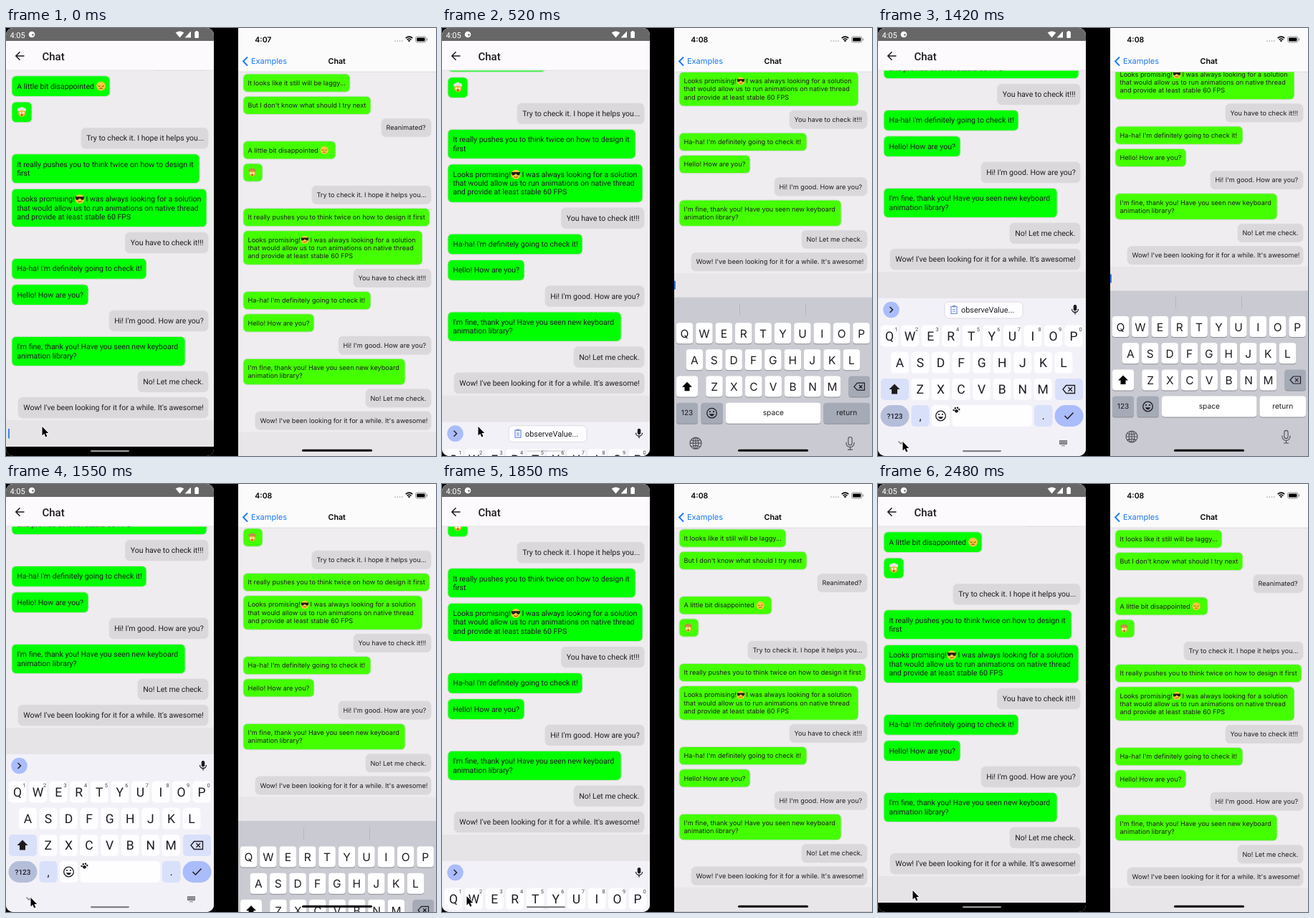
Animation of 600 by 597 pixels, one loop 2.51 s. Source, as an HTML page with a canvas:

```html
<!DOCTYPE html>
<html>
<head>
<meta charset="utf-8">
<style>
  html, body { margin: 0; width: 100%; height: 100%; overflow: hidden; background: #000; }
  canvas { display: block; }
</style>
</head>
<body>
<canvas id="stage" width="600" height="597"></canvas>
<script>
const ctx = document.getElementById('stage').getContext('2d');
ctx.textRendering = 'geometricPrecision';
const LOOP = 2510;
const ROBOTO = 'Roboto, sans-serif', INTER = 'Inter, sans-serif';
const INK = '#1d1b20';

// Newest first: text lines, sent by me?, bubble width on each phone
const MESSAGES = [
  ["Wow! I've been looking for it for a while. It's awesome!", true, 265, 245],
  ['No! Let me check.', true, 98, 91],
  ["I'm fine, thank you! Have you seen new keyboard\nanimation library?", false, 242, 226],
  ["Hi! I'm good. How are you?", true, 138, 129],
  ['Hello! How are you?', false, 107, 99],
  ["Ha-ha! I'm definitely going to check it!", false, 188, 178],
  ['You have to check it!!!', true, 115.5, 108],
  ['Looks promising!😎 I was always looking for a solution\nthat would allow us to run animations on native thread\nand provide at least stable 60 FPS', false, 272, 250],
  ['It really pushes you to think twice on how to design it| first', false, 262, 260],
  ['Try to check it. I hope it helps you...', true, 177, 166],
  ['🤯', false, 28, 27],
  ['A little bit disappointed 😔', false, 137, 129],
  ['Reanimated?', true, 78, 69],
  ["But I don't know what should I try next", false, 192, 178],
  ['It looks like it still will be laggy...', false, 160, 149]
];

const LEFT = {
  id: 2, x: 8, right: 282, bottom: 544, line: 12.3, pad: 16.4, gap: 7.6, inset: 7.2,
  baseline: 17.9, size: 10.55, family: ROBOTO, green: '#00ff00', cloud: '#e9e2de', wrap: '\n'
};
const RIGHT = {
  id: 3, x: 331, right: 593, bottom: 560.2, line: 11.2, pad: 14, gap: 6.04, inset: 6.5,
  baseline: 15.8, size: 9.1, family: INTER, green: '#44ff00', cloud: '#c98a4a', wrap: ' '
};

const clamp = v => Math.min(1, Math.max(0, v));
const ramp = (t, from, to) => clamp((t - from) / (to - from));

// Material "fast out, slow in": cubic-bezier(.4, 0, .2, 1)
function standardEase(x) {
  if (x <= 0 || x >= 1) return clamp(x);
  let lo = 0, hi = 1, s = 0.5;
  for (let i = 0; i < 20; i++) {
    s = (lo + hi) / 2;
    const bx = 1.2 * s * (1 - s) ** 2 + 0.6 * s * s * (1 - s) + s ** 3;
    if (bx < x) lo = s; else hi = s;
  }
  return 3 * s * s * (1 - s) + s ** 3;
}

// Critically damped spring
function spring(ms) {
  const x = Math.max(0, ms) * 0.02;
  return 1 - (1 + x) * Math.exp(-x);
}

function rect(x, y, w, h, fill) {
  ctx.fillStyle = fill;
  ctx.fillRect(x, y, w, h);
}

function box(x, y, w, h, r, fill, stroke) {
  ctx.beginPath();
  ctx.roundRect(x, y, w, h, r);
  ctx.fillStyle = fill;
  ctx.fill();
  if (stroke) {
    ctx.strokeStyle = stroke;
    ctx.lineWidth = 1;
    ctx.stroke();
  }
}

const dot = (x, y, r, fill) => box(x - r, y - r, 2 * r, 2 * r, r, fill);

function text(str, x, y, font, color = INK, align = 'left') {
  ctx.font = font;
  ctx.fillStyle = color;
  ctx.textAlign = align;
  ctx.fillText(str, x, y);
}

// Strokes a path around (x, y), or fills it when no width is given
function icon(d, x, y, color, width) {
  ctx.save();
  ctx.translate(x, y);
  const path = new Path2D(d);
  if (width) {
    ctx.strokeStyle = color;
    ctx.lineWidth = width;
    ctx.stroke(path);
  } else {
    ctx.fillStyle = color;
    ctx.fill(path);
  }
  ctx.restore();
}

function emoji(kind, x, y, r, cloud) {
  ctx.save();
  ctx.translate(x, y);
  ctx.scale(r / 6, r / 6);
  if (kind === '🤯') {
    dot(0, 1.2, 4.8, '#f7b23c');
    icon('M-5 -1Q-7 -5.5 -3 -5.5Q0 -8 3 -5.5Q7 -5.5 5 -1Q0 -3 -5 -1Z', 0, 0, cloud);
    dot(-2, 1, 1.3, '#fff');
    dot(2, 1, 1.3, '#fff');
    dot(0, 3.8, 1.1, '#7a4a1c');
  } else {
    dot(0, 0, 6, '#ffc83d');
  }
  if (kind === '😎') {
    icon('M-6 -3H6L5 1Q3 2 1 0L0 -1L-1 0Q-3 2 -5 1Z', 0, 0, '#221c1c');
    icon('M-2.5 3Q0 5 3 2.5', 0, 0, '#8a4b13', 1);
  } else if (kind === '😔') {
    icon('M-4 -1Q-2.5 1 -1 0M1 0Q2.5 1 4 -1M-2 3.5Q0 2 2 3.5', 0, 0, '#8a4b13', 1);
  }
  ctx.restore();
}

function richText(line, x, y, p) {
  for (const part of line.split(/(😎|😔|🤯)/u).filter(Boolean)) {
    if (/[😎😔🤯]/u.test(part)) {
      emoji(part, x + p.size * 0.66, y - p.size * 0.35, p.size * 0.6, p.cloud);
      x += p.size * 1.22;
    } else {
      text(part, x, y, `${p.size}px ${p.family}`);
      x += ctx.measureText(part).width;
    }
  }
}

function messages(p, shift) {
  let bottom = p.bottom - shift;
  for (const m of MESSAGES) {
    const lines = m[0].replace('| ', p.wrap).split('\n');
    const h = lines.length * p.line + p.pad, w = m[p.id];
    const x = m[1] ? p.right - w : p.x, y = bottom - h;
    box(x, y, w, h, 6, m[1] ? '#dad8da' : p.green, m[1] ? '#dddbdd' : '#cfdccf');
    lines.forEach((line, i) => richText(line, x + p.inset, y + p.baseline + i * p.line, p));
    bottom = y - p.gap;
  }
}

function letterKeys(starts, step, top, rowStep, w, h, font, key) {
  ['QWERTYUIOP', 'ASDFGHJKL', 'ZXCVBNM'].forEach((row, r) => {
    [...row].forEach((letter, i) => {
      const x = starts[r] + i * step, y = top + r * rowStep;
      key(x - w / 2, y, w, h);
      text(letter, x, y + h / 2 + 6.2, font, INK, 'center');
      if (step > 28 && r === 0) text((i + 1) % 10, x + 9.5, y + 8, `7.5px ${ROBOTO}`, '#444', 'center');
    });
  });
}

function smiley(x, y, r) {
  icon(`M${r} 0A${r} ${r} 0 1 1 ${-r} 0A${r} ${r} 0 1 1 ${r} 0`, x, y, INK, 1.3);
  icon('M-3.8 1.2Q0 7.5 3.8 1.2Z', x, y, INK);
  dot(x - 2.5, y - 2, 1.1, INK);
  dot(x + 2.5, y - 2, 1.1, INK);
}

function androidKeyboard(shift, t) {
  const accent = '#aabcfb', soft = '#d9e0fa';
  rect(0, 584 - shift, 290, 230, '#f3f1f8');
  ctx.save();
  ctx.translate(0, 207 - shift);
  dot(18.5, 393, 11.3, accent);
  icon('M-2 -4L2 0L-2 4', 18.5, 393, INK, 1.4);
  if (t < 1550) {
    box(93, 382, 109, 23, 6, '#fdfcff', '#dcdae2');
    icon('M-4 -5H4V5H-4ZM-2 -1H2M-2 1.5H2', 106, 393.5, '#6f8de0', 1.2);
    rect(104, 387, 4, 2.5, '#6f8de0');
    text('observeValue...', 116, 397, `10.9px ${ROBOTO}`);
  }
  box(272.7, 386, 4.6, 8.5, 2.3, INK);
  icon('M-4.5 -1A4.5 4.5 0 0 0 4.5 -1M0 3.5V6.5', 275, 393, INK, 1.3);

  const key = (x, y, w, h, fill = '#fefdff', r = 5) => box(x, y, w, h, r, fill);
  letterKeys([16, 30.4, 58.8], 28.57, 414.5, 37.2, 25, 30, `17.5px ${ROBOTO}`, key);
  key(4, 489, 39, 30, soft);
  icon('M0 -7.5L7.5 0H4V6.5H-4V0H-7.5Z', 23, 504, INK);
  key(247, 489, 39, 30, soft);
  icon('M-4 -5.5H8V5.5H-4L-8.5 0ZM-1 -2.7L4.5 2.7M4.5 -2.7L-1 2.7', 266.5, 504, INK, 1.4);
  key(3.5, 526, 40, 30, '#b5bed9', 15);
  text('?123', 23.5, 545, `500 10px ${ROBOTO}`, INK, 'center');
  key(46.5, 526, 25, 30, soft);
  text(',', 59, 547, `16px ${ROBOTO}`, INK, 'center');
  key(75, 526, 25, 30);
  smiley(87.5, 541, 6.8);
  key(103.5, 526, 111.5, 30);
  dot(109.5, 534.3, 2.4, INK);
  [[-3.7, 533], [-1.5, 530.2], [1.7, 529.7], [4, 532]].forEach(([dx, y]) => dot(109.3 + dx, y, 1.2, INK));
  key(218, 526, 25.5, 30, soft);
  text('.', 230.7, 546, `16px ${ROBOTO}`, INK, 'center');
  key(246.5, 526, 40, 30, accent, 15);
  icon('M-6 0L-2 4L6 -4.5', 266.5, 541, INK, 1.5);
  ctx.restore();
}

function androidNav(shift, t) {
  if (!shift) {
    rect(0, 584, 290, 13, '#000');
    box(118, 589, 54, 2.2, 1.1, '#9a9a9a');
    return;
  }
  ctx.globalAlpha = 0.25 + 0.75 * ramp(t, 740, 1100);
  box(118, 589, 54, 2.2, 1.1, '#808084');
  if (shift > 200) {
    icon('M-3.5 -1.5L0 2L3.5 -1.5', 32, 578, '#77777c', 1.3);
    rect(253, 575, 11, 6, '#77777c');
    for (let i = 0; i < 8; i++) rect(254.3 + (i % 4) * 2.5, 576.3 + (i >> 2) * 2, 1, 1, '#f3f1f8');
    rect(256, 582.2, 5, 1, '#77777c');
  }
  ctx.globalAlpha = 1;
  if (t >= 1640 && t < 1740) box(-4, 561, 70, 35, 17, 'rgba(0,0,0,.14)');
}

function androidPhone(t) {
  const shift = 207 * (standardEase(ramp(t, 459, 744)) - standardEase(ramp(t, 1720, 2005)));
  ctx.save();
  ctx.beginPath();
  ctx.roundRect(0, 0, 290, 597, 10);
  ctx.clip();
  rect(0, 0, 290, 597, '#efecef');
  messages(LEFT, shift);
  rect(0, 547 - shift, 290, 37, '#e6e4e6');
  if (t < 400 || (t >= 700 && t < 1250)) rect(3, 559 - shift, 2, 13.5, '#3b86e0');
  if (shift) androidKeyboard(shift, t);
  androidNav(shift, t);

  rect(0, 0, 290, 59, '#fcfafc');
  rect(0, 58.5, 290, 1, '#e3e1e3');
  rect(0, 0, 290, 18, '#676767');
  text('4:05', 5.5, 13.5, `11px ${ROBOTO}`, '#fff');
  dot(36, 9, 4.3, '#fff');
  dot(37.5, 9.5, 1.3, '#676767');
  icon('M0 4.5L-5.8 -2.5Q0 -6.5 5.8 -2.5Z', 242.5, 9, '#fff');
  icon('M4 -4.5V4.5H-4.5Z', 254, 9, '#fff');
  box(263.3, 5, 5.6, 9, 1, '#fff');
  rect(264.8, 4, 2.6, 1.2, '#fff');
  icon('M6 0H-5.5M0 -5.7L-5.7 0L0 5.7', 19.5, 39, INK, 1.5);
  text('Chat', 50.5, 45, `500 15px ${ROBOTO}`);
  ctx.restore();
}

function iosKeyboard(shift, pressed) {
  const grey = '#a5aab7';
  ctx.save();
  ctx.translate(0, 230.5 - shift);
  rect(324, 366.5, 276, 231, '#cacbd2');
  rect(415, 375, 1, 17, '#b4b6bf');
  rect(507, 375, 1, 17, '#b4b6bf');
  const key = (x, y, w, h, fill = '#fff') => {
    box(x, y + 1, w, h, 4, '#8b8d94');
    box(x, y, w, h, 4, fill);
  };
  letterKeys([338.5, 352.3, 380], 27.4, 402, 37.2, 23.5, 29, `15.5px ${INTER}`, key);
  key(327, 476.4, 30, 29);
  icon('M0 -6.5L7 .5H3.5V6H-3.5V.5H-7Z', 342, 491, '#000');
  key(567.5, 476.4, 29.5, 29, grey);
  icon('M-3 -5H7V5H-3L-7.5 0ZM-.5 -2.3L4 2.3M4 -2.3L-.5 2.3', 582.5, 491, INK, 1.2);
  key(327, 513.5, 30, 29, grey);
  text('123', 342, 531.3, `10px ${INTER}`, INK, 'center');
  key(361.5, 513.5, 30.5, 29, grey);
  smiley(376.5, 528, 6.8);
  key(396, 513.5, 132.5, 29);
  text('space', 462.3, 531, `10.2px ${INTER}`, INK, 'center');
  key(532.5, 513.5, 64.5, 29, pressed ? '#fff' : grey);
  text('return', 564.7, 531, `10.2px ${INTER}`, INK, 'center');
  icon('M8 0A8 8 0 1 1 -8 0A8 8 0 1 1 8 0M3.8 0A3.8 8 0 1 1 -3.8 0A3.8 8 0 1 1 3.8 0M0 -8V8M-8 0H8M-6.5 -4.5Q0 -2 6.5 -4.5M-6.5 4.5Q0 2 6.5 4.5',
    354, 570, '#4c4e55', 1.1);
  icon('M-2.6 -6A2.6 2.6 0 0 1 2.6 -6V0A2.6 2.6 0 0 1 -2.6 0ZM-5.5 -1.5V0A5.5 5.5 0 0 0 5.5 0V-1.5M0 5.5V9M-3.5 9H3.5',
    569.5, 570, '#4c4e55', 1.1);
  ctx.restore();
}

function iosPhone(t) {
  const shift = 230.5 * (spring(t - 270) - spring(t - 1475));
  ctx.save();
  ctx.beginPath();
  ctx.rect(324, 0, 276, 597);
  ctx.clip();
  rect(324, 0, 276, 597, '#efedf0');
  messages(RIGHT, shift);
  rect(324, 563.5 - shift, 276, 34, '#e8e6e9');
  if (t >= 270 && t < 1475) rect(324, 574 - shift, 2, 12, '#3478e8');
  if (shift > 0.1) iosKeyboard(shift, t >= 1380 && t < 1480);
  box(413, 587.7, 98, 3, 1.5, '#000');

  rect(324, 0, 276, 61, '#fcfbfc');
  rect(324, 60.7, 276, 0.8, '#d6d4d7');
  text(t < 270 ? '4:07' : '4:08', 347.3, 19.8, `600 10.5px ${INTER}`, '#000');
  for (let i = 0; i < 4; i++) dot(543 + i * 3.3, 18.2, 0.9, '#b5b5b8');
  icon('M-4.8 -1.4Q0 -5.4 4.8 -1.4M-2.9 .8Q0 -1.8 2.9 .8', 562.5, 15.5, '#000', 1.6);
  icon('M0 4L-1.8 2Q0 .7 1.8 2Z', 562.5, 15.5, '#000');
  box(571.5, 12, 14.5, 8, 2.2, '#fcfbfc', '#8d8d8f');
  box(573, 13.5, 11.5, 5, 1, '#000');
  rect(587, 14.5, 1, 3, '#8d8d8f');
  icon('M3 -6L-3 0L3 6', 334, 46.5, '#1a7af8', 1.9);
  text('Examples', 342, 50, `11px ${INTER}`, '#1a7af8');
  text('Chat', 461.7, 50, `600 10.7px ${INTER}`, '#000', 'center');
  ctx.restore();
}

// Pointer stops: time, x, y
const POINTER = [
  [0, 50, 556], [900, 50, 556], [1250, 34, 577], [1810, 34, 577],
  [1850, 34, 575], [2480, 48, 567], [LOOP, 50, 556]
];

function pointer(t) {
  const i = POINTER.findIndex(stop => stop[0] > t);
  const [t0, x0, y0] = POINTER[i - 1], [t1, x1, y1] = POINTER[i];
  const k = ramp(t, t0, t1), s = k * k * (3 - 2 * k);
  const x = x0 + (x1 - x0) * s, y = y0 + (y1 - y0) * s;
  const arrow = 'M.5 0V12.5L3.3 9.8L5.3 14.5L7.4 13.6L5.4 9H9.2Z';
  icon(arrow, x, y, '#fff', 1.6);
  icon(arrow, x, y, '#000');
}

function draw() {
  const t = performance.now() % LOOP;
  rect(0, 0, 600, 597, '#000');
  androidPhone(t);
  iosPhone(t);
  pointer(t);
  requestAnimationFrame(draw);
}
draw();
</script>
</body>
</html>
```
